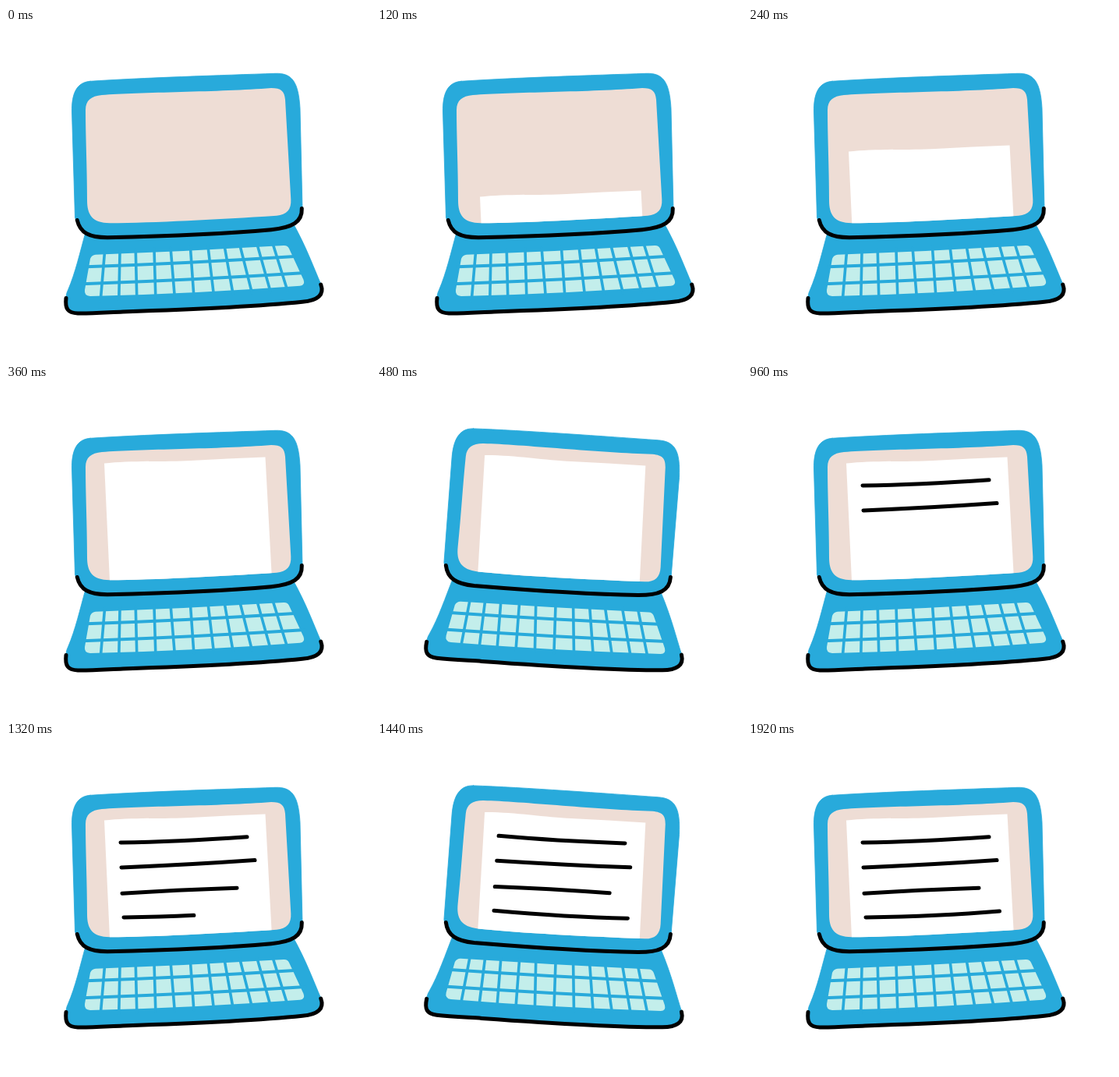
An HTML page with a canvas that plays this animation: 468x422 px, repeating every 1.96 s.

```html
<!DOCTYPE html>
<html lang="en">
<head>
<meta charset="utf-8">
<title>Laptop</title>
<style>
html, body { margin: 0; width: 100%; height: 100%; overflow: hidden; background: #fff; }
canvas { display: block; width: 468px; height: 422px; }
</style>
</head>
<body>
<canvas id="stage"></canvas>
<script>
const W = 468, H = 422;
const LOOP = 1960, STEP = 120, TILT_HOLD = 480, TILT = Math.PI / 30;
const BLUE = '#28aadb', SCREEN = '#eeddd5', KEY = '#c3eeeb', INK = '#000', PAPER = '#fff';

const canvas = document.getElementById('stage');
const ctx = canvas.getContext('2d');
const ratio = window.devicePixelRatio || 1;
canvas.width = W * ratio;
canvas.height = H * ratio;

const lid = new Path2D(`M108 68.3 C170 64 280 60.5 345 58.3 C367 57.5 375 69 377 103
  L380 232 C380 248 368 256 340 259 C280 264 190 267 130 268.5
  C108 268.5 94 262 88.5 243 L84.5 108 C84 83 91 69.5 108 68.3 Z`);
const lidEdge = new Path2D(`M91.3 246.5 C95 263 107 268.7 130 268.7
  C195 267.2 280 264 340 258.7 C367 256 380 249 379.3 231.5`);
const screen = new Path2D(`M123 86 C170 82.2 275 82.2 340 77 C353 77 357 81 358 92
  L365.3 220 C366 233 360 239.5 347 240.7 C270 245.5 190 250 133 250.2
  C111 250 104 240 104 221 C104 180 102 140 102 105 C102 93 109 87.3 123 86 Z`);
const base = new Path2D(`M102 262 C95 287 89 314 79.5 336 C77.5 340 77 343 77 347
  C75.5 361 79 366 92 366 C180 363 290 360 380 351 C401 349 408.5 342 404 329
  C394 306 385 281 369 252 Z`);
const baseEdge = new Path2D(`M77 346.5 C75.5 360 79 365.5 92 366 C110 366.3 130 364.8 150 364
  C240 361 320 357.5 380 351.3 C400 349.5 408.5 342 403.7 329`);
const keyboard = new Path2D(`M115 290.7 Q236 286.3 356 279 Q361 278.6 363 283
  L381.5 323 Q384 330 377 330.7 Q240 341 108 344 Q100 343.5 101 336
  L108 296 Q110 291 115 290.7 Z`);
const rowGaps = new Path2D('M103 306.3 Q236 301.7 370 293 M98 328.3 Q241 323.2 384 314');
const sheet = new Path2D(`M126 100.6 C160 96.5 205 99 237 97 S300 94 332.5 92.5
  L341 250 L133.5 262 Z`);

// Column gaps: x in the middle of the top and bottom key rows.
const gapTops = [125.6, 145.8, 166.5, 190.3, 212, 237.2, 260.3, 282, 302.6, 325, 345.3];
const gapEnds = [122.2, 145, 167.5, 191.5, 215.3, 240, 265, 289, 312.5, 336, 357.5];

// Each text line: start, control and end point of a quadratic curve.
const textLines = [
  [147, 129, 218, 128, 309, 121.7],
  [148, 161, 235, 157.5, 319, 151.6],
  [149, 194.3, 216, 189.7, 296, 187.2],
  [151, 225, 245, 223.5, 322.5, 217]
];

const mix = (a, b, k) => a + (b - a) * k;

function fill(path, color) {
  ctx.fillStyle = color;
  ctx.fill(path);
}

function stroke(path, color, width) {
  ctx.strokeStyle = color;
  ctx.lineWidth = width;
  ctx.stroke(path);
}

function drawBody(path) {
  fill(path, BLUE);
  stroke(path, BLUE, 0.8);
}

function drawKeys() {
  fill(keyboard, KEY);
  stroke(rowGaps, BLUE, 4);
  const columns = new Path2D();
  gapTops.forEach((x, i) => {
    const top = 298 - i * 1.1, end = 338 - i * 1.2;
    columns.moveTo(mix(x, gapEnds[i], -0.3), mix(top, end, -0.3));
    columns.lineTo(mix(x, gapEnds[i], 1.3), mix(top, end, 1.3));
  });
  stroke(columns, BLUE, 3.6);
}

// Draws the first part k (0 to 1) of a text line.
function drawText([x0, y0, cx, cy, x1, y1], k) {
  const ax = mix(x0, cx, k), ay = mix(y0, cy, k);
  const bx = mix(cx, x1, k), by = mix(cy, y1, k);
  const path = new Path2D();
  path.moveTo(x0, y0);
  path.quadraticCurveTo(ax, ay, mix(ax, bx, k), mix(ay, by, k));
  stroke(path, INK, 5);
}

function drawPage(step) {
  const left = Math.max(0, 3 - step);
  ctx.save();
  ctx.clip(screen);
  ctx.translate(left * 3, left * 58);
  fill(sheet, PAPER);
  ctx.restore();

  const halves = step - 4;
  textLines.forEach((line, i) => {
    const k = Math.min(1, (halves - 2 * i) / 2);
    if (k > 0) drawText(line, k);
  });
}

function draw(t) {
  const step = Math.floor(t / STEP);
  const tilted = Math.floor(t / TILT_HOLD) % 2 === 1;

  ctx.setTransform(ratio, 0, 0, ratio, 0, 0);
  ctx.fillStyle = '#fff';
  ctx.fillRect(0, 0, W, H);
  ctx.lineCap = ctx.lineJoin = 'round';

  if (tilted) {
    ctx.translate(W / 2, H / 2);
    ctx.rotate(TILT);
    ctx.translate(-W / 2, -H / 2);
  }

  drawBody(base);
  drawKeys();
  stroke(baseEdge, INK, 5);
  drawBody(lid);
  fill(screen, SCREEN);
  drawPage(step);
  stroke(lidEdge, INK, 5);
}

const start = performance.now();

function tick() {
  draw((performance.now() - start) % LOOP);
  requestAnimationFrame(tick);
}

tick();
</script>
</body>
</html>
```
